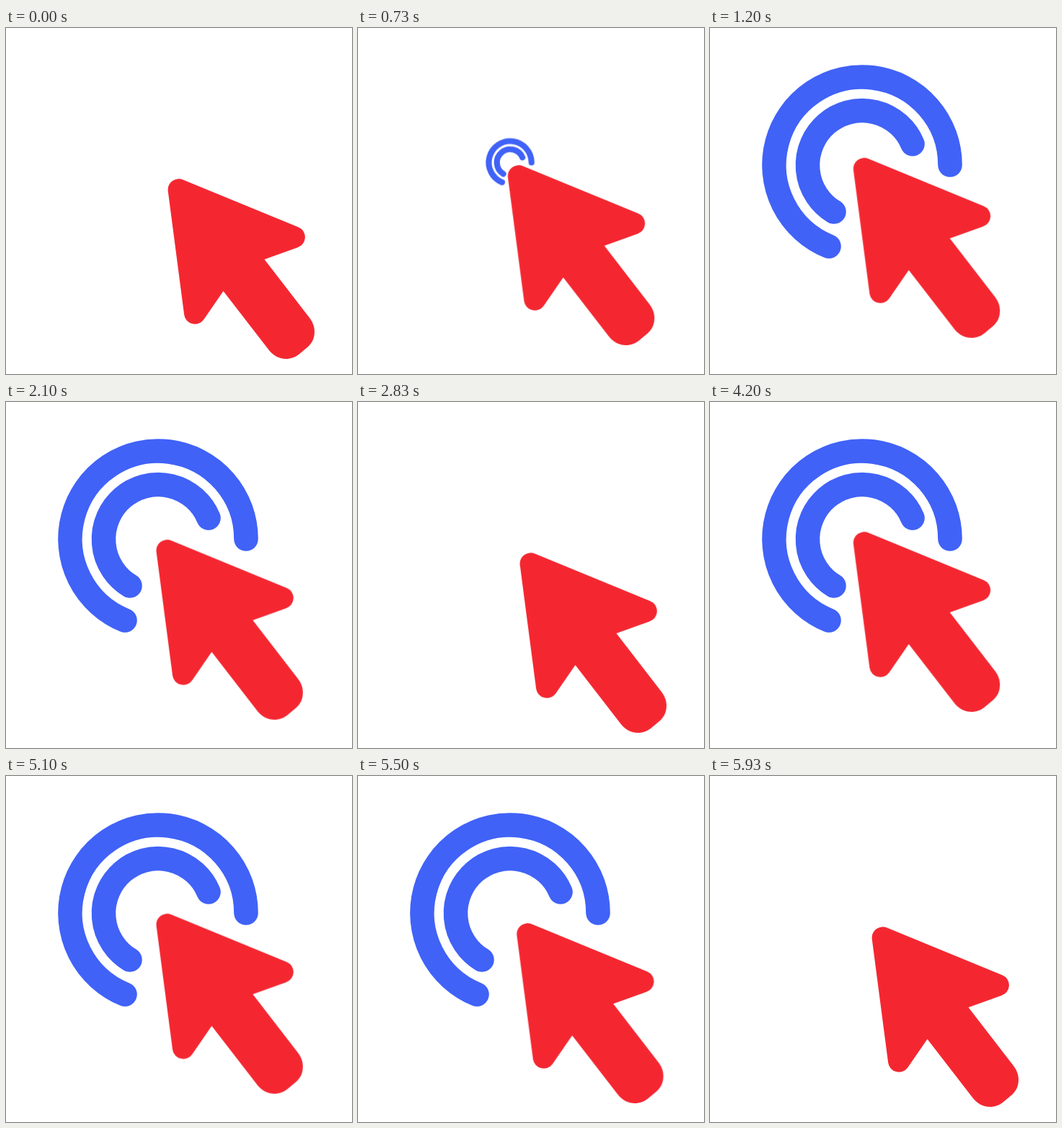
These frames come from a looping animation (480 by 480 pixels, 6.01 s). An HTML page:

```html
<!DOCTYPE html>
<html lang="en">
<head>
<meta charset="utf-8">
<title>Click</title>
<style>
  html, body {
    margin: 0;
    width: 100%;
    height: 100%;
    overflow: hidden;
    background: #fff;
  }
  svg { display: block; width: 100%; height: 100%; }

  .rings {
    fill: none;
    stroke: #4062f7;
    stroke-width: 33.6;
    stroke-linecap: round;
    transform-origin: 211px 185.5px;
    animation: pop 3s ease-in-out infinite paused;
  }
  .pointer {
    fill: #f42731;
    animation: press 3s ease-in-out infinite paused;
  }

  @keyframes pop {
    0%, 19.3% { transform: scale(0); }
    36%, 84.7% { transform: scale(1); }
    94.8%, 100% { transform: scale(0); }
  }
  @keyframes press {
    0% { transform: translate(0, 0); }
    42.7%, 50% { transform: translate(-26px, -29.4px); }
    96.7%, 100% { transform: translate(0, 0); }
  }
</style>
</head>
<body>
<svg viewBox="0 0 480 480">
  <g class="rings">
    <path d="M333 190A122 122 0 1 0 165 303"/>
    <path d="M281 161A75.7 75.7 0 1 0 172 255"/>
  </g>
  <path class="pointer" d="M224.7 226L247.2 398A15 15 0 0 0 274.3 404.4L301.5 365L364.5 446.5
    C371 455 380 459 388 459C396 459 401 456.5 406 453L418 443C425 437 428 430 428 421
    C428 414 425.5 408 421 402L358.5 321L404.5 304.5A15 15 0 0 0 405.5 276.3L245.5 210.5
    A15 15 0 0 0 224.7 226Z"/>
</svg>
<script>
  const LOOP = 6010, STEP = 50, LAST = 119;
  const anims = document.getAnimations();

  // 20 poses a second, held for 30 and 70 ms in turn
  function draw(now) {
    const ms = now % LOOP;
    const pose = 2 * Math.floor(ms / 100) + (ms % 100 >= 30 ? 1 : 0);
    for (const a of anims) a.currentTime = Math.min(pose, LAST) * STEP;
  }

  let start;
  function tick(now) {
    start ??= now;
    draw(now - start);
    requestAnimationFrame(tick);
  }
  draw(0);
  requestAnimationFrame(tick);
</script>
</body>
</html>
```
